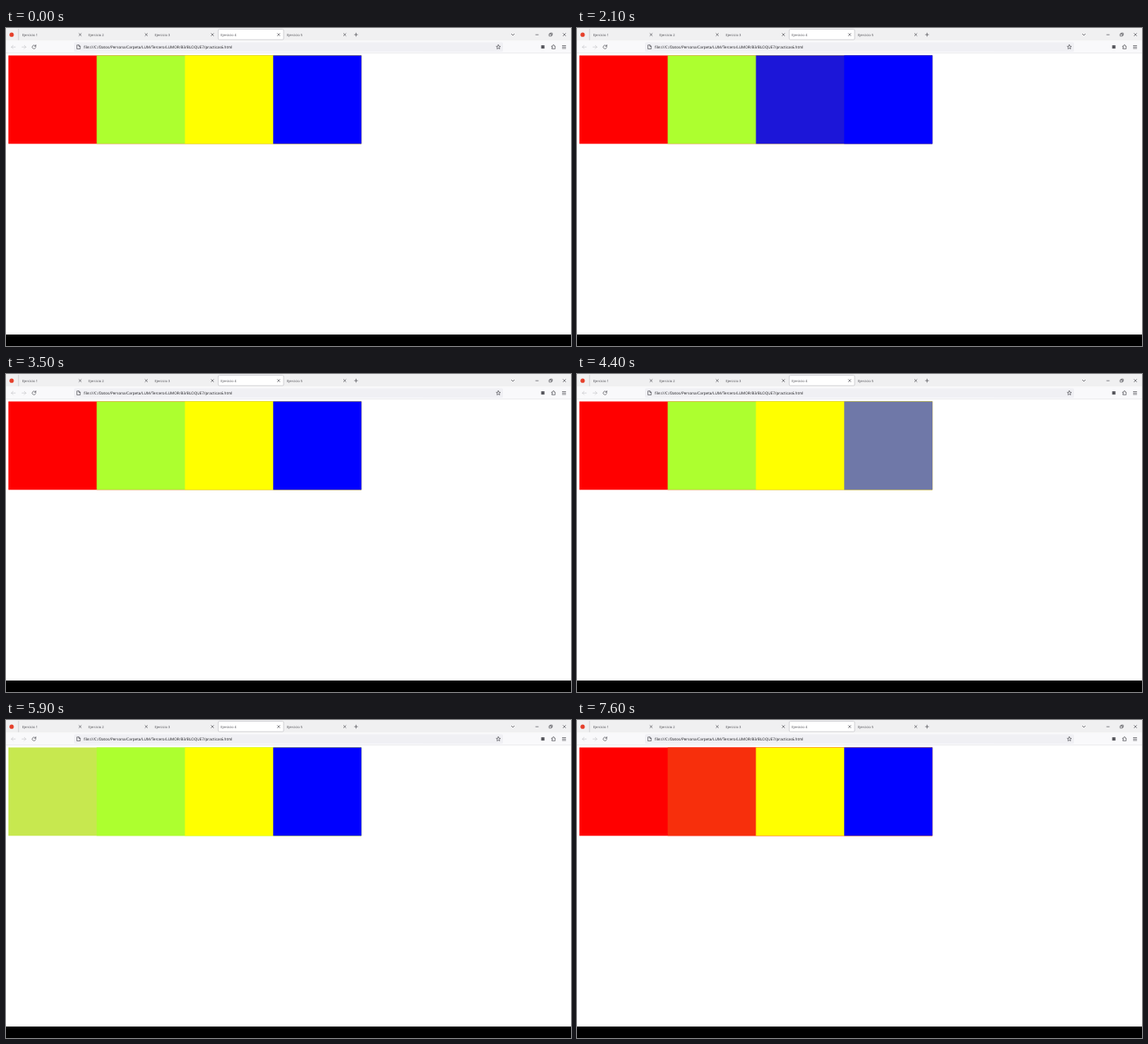
An HTML page that plays this animation: 690 by 388 pixels, repeating every 8000 ms.

```html
<!DOCTYPE html>
<html lang="es">
<head>
<meta charset="utf-8">
<title>Cuadrados de color</title>
<style>
  html, body { margin: 0; width: 100%; height: 100%; overflow: hidden; background: #fff; }
  svg { display: block; width: 690px; height: 388px; }
  text { font-family: "Open Sans", "Noto Sans", sans-serif; text-rendering: geometricPrecision; }
  .line { fill: none; stroke: #45454b; stroke-width: .65; stroke-linecap: round; stroke-linejoin: round; }
  .faint { stroke: #c4c4c8; }
</style>
</head>
<body>
<svg id="stage" viewBox="0 0 690 388">
  <rect width="690" height="388" fill="#fff"/>
  <rect width="690" height="15.6" fill="#f0f0f1"/>
  <rect y="15.6" width="690" height="14.4" fill="#f9f9fb"/>
  <rect y="30" width="690" height=".5" fill="#d8d8dc"/>
  <rect y="374" width="690" height="14" fill="#000"/>

  <circle cx="6.9" cy="8.2" r="2.6" fill="#e5402b"/>
  <path class="line faint" d="M15.3 1.5V14.5"/>
  <rect x="259.2" y="1.6" width="79.8" height="12.6" rx="1.4" fill="#fff" stroke="#b9b9be" stroke-width=".6"/>
  <g id="tabs"></g>

  <g class="line">
    <path d="M427.5 6.2v3.8M425.6 8.1h3.8"/>
    <path d="M617.3 7.3l1.7 1.7 1.7-1.7"/>
    <path d="M647 8.2h3"/>
    <path d="M663.6 7.2h2.6v2.6h-2.6zM664.5 7.1v-.9h2.6v2.6h-.8"/>
    <path d="M680.4 6.6l3 3m0-3l-3 3"/>
    <path class="faint" d="M11.3 23.2H6.6m2-2l-2 2 2 2"/>
    <path class="faint" d="M19.6 23.2h4.7m-2-2l2 2-2 2"/>
    <path d="M36 21.8a2.2 2.2 0 1 0 .4 1.9M36.5 20.7v1.6h-1.6"/>
  </g>

  <rect x="83" y="17.6" width="524" height="11.2" rx="1.4" fill="#f0f0f4"/>
  <g class="line">
    <path d="M87 20.8h2.1l1.5 1.5v3.2H87zM89 20.9v1.5h1.5"/>
    <path id="star"/>
    <path d="M666.7 22h1.1v-.7a.8.8 0 0 1 1.6 0v.7h1.2v3.4h-3.9v-1.1h.6a.7.7 0 0 0 0-1.2h-.6z"/>
    <path d="M679.5 21.5h4M679.5 23.2h4M679.5 24.9h4"/>
  </g>
  <rect x="653.6" y="21.1" width="4" height="4" fill="#55555b"/>
  <text x="95" y="24.9" font-size="4.64" fill="#18181c">file:///C:/Datos/Persona/Carpeta/LUM/Tercero/LUMOR/B3/BLOQUE7/practicas6.html</text>
  <g id="squares"></g>
</svg>
<script>
const NS = "http://www.w3.org/2000/svg";
const LOOP = 8000;
const SIZE = 107.8, LEFT = 2.9, TOP = 33.5;
const BASE = ["#ff0000", "#adff2f", "#ffff00", "#0000ff"];

// Hover changes: start time, square index (-1 for none), hover colour.
const HOVERS = [
  [0, -1],
  [1300, 0, "#e3d86b"],
  [1600, 1, "#8fa872"],
  [2100, 2, "#1c16d8"],
  [2700, 3, "#7a5fb0"],
  [3500, -1],
  [4400, 3, "#6f78a8"],
  [4900, 2, "#f5cda0"],
  [5400, 1, "#9fb57a"],
  [5900, 0, "#c7e84f"],
  [6500, -1],
  [7100, 0, "#b0645a"],
  [7600, 1, "#f72f0c"]
];

function add(parent, tag, attrs, label = "") {
  const el = document.createElementNS(NS, tag);
  for (const key in attrs) el.setAttribute(key, attrs[key]);
  el.textContent = label;
  return parent.appendChild(el);
}

const tabs = document.getElementById("tabs");
for (let i = 0; i < 5; i++) {
  const x = 19.8 + 80.8 * i;
  add(tabs, "text", { x, y: 9.7, "font-size": 4.1, fill: "#4a4a50" }, `Ejercicio ${i + 1}`);
  add(tabs, "path", { class: "line", d: `M${x + 69.3} 6.7l2.8 2.8m0-2.8l-2.8 2.8` });
}

const points = Array.from({ length: 10 }, (_, i) => {
  const a = i * Math.PI / 5 - Math.PI / 2, r = i % 2 ? 1.3 : 2.7;
  return `${601.3 + r * Math.cos(a)} ${23.3 + r * Math.sin(a)}`;
});
document.getElementById("star").setAttribute("d", `M${points.join("L")}Z`);

// Each square reaches under the ones to its right, so no seams show.
const group = document.getElementById("squares");
const squares = BASE.map((fill, i) => add(group, "rect", {
  x: LEFT + SIZE * i, y: TOP, width: SIZE * (4 - i), height: SIZE, fill
}));

function draw(time) {
  const [, hovered, colour] = HOVERS.findLast(h => h[0] <= time);
  squares.forEach((el, i) => el.setAttribute("fill", i === hovered ? colour : BASE[i]));
}

const start = performance.now();
function tick() {
  draw((performance.now() - start) % LOOP);
  requestAnimationFrame(tick);
}
tick();
</script>
</body>
</html>
```
